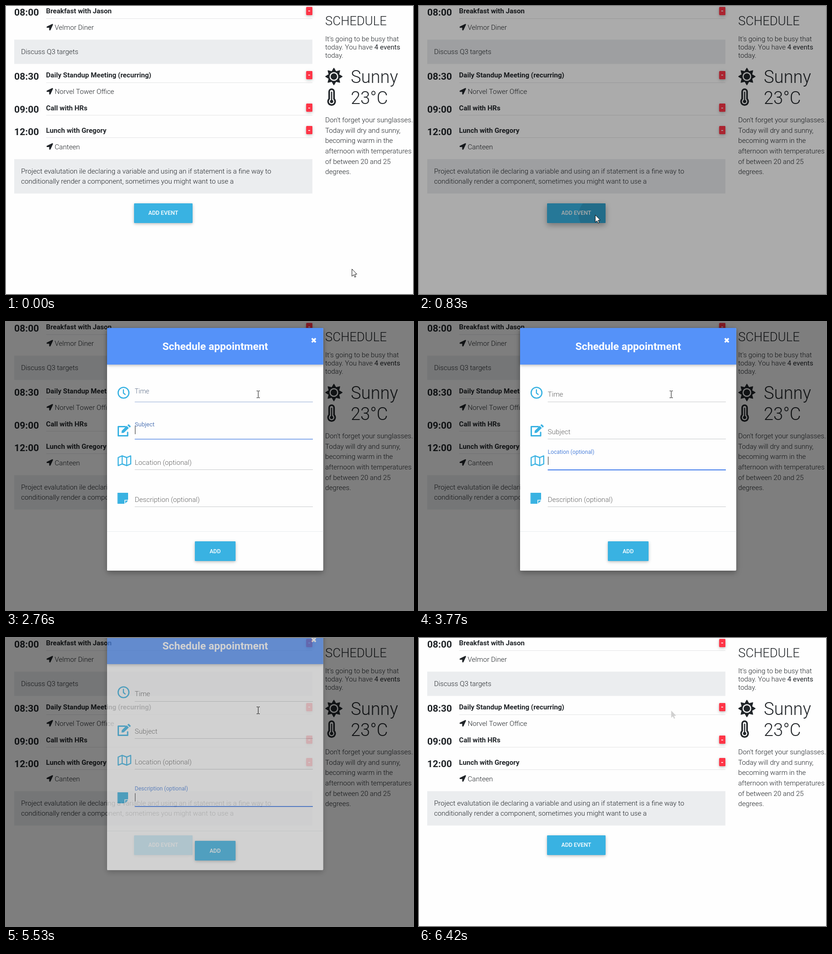
An HTML page with a canvas that plays this animation: 890x629 px, repeating every 6650 ms.

```html
<!DOCTYPE html>
<html lang="en">
<head>
<meta charset="utf-8">
<title>Schedule</title>
<style>
html, body { margin: 0; width: 100%; height: 100%; overflow: hidden; background: #fefefe; }
canvas { display: block; }
</style>
</head>
<body>
<canvas id="stage" width="890" height="629"></canvas>
<script>
const W = 890, H = 629, LOOP = 6650;
const INK = '#212529', SKY = '#39b2e2', BLUE = '#5592f9', PAPER = '#fefefe';
const BASE = 15.15;

const stage = document.getElementById('stage').getContext('2d');
const layer = document.createElement('canvas');
layer.width = W;
layer.height = H;
const dialog = layer.getContext('2d');

// Times in ms
const HOVER = 620, CLICK = 690, DIM = 720, OPEN = 870, CLOSE = 5476, UNDIM = 5762, GHOST = 6420;
const BLINK = 530;

// Shadow layers: drop, blur, opacity
const LOW = [[2, 5, 0.16], [2, 10, 0.12]];
const HIGH = [[5, 11, 0.18], [4, 15, 0.15]];

const events = [
  { y: 11, time: '08:00', title: 'Breakfast with Jason', place: 'Velmor Diner' },
  { y: 151, time: '08:30', title: 'Daily Standup Meeting (recurring)', place: 'Norvel Tower Office' },
  { y: 222.5, time: '09:00', title: 'Call with HRs' },
  { y: 271.5, time: '12:00', title: 'Lunch with Gregory', place: 'Canteen' }
];
const fields = [
  { label: 'Time', base: 163, line: 174, on: 2290, off: 2646 },
  { label: 'Subject', base: 245, line: 255, on: 2646, off: 3505 },
  { label: 'Location (optional)', base: 312, line: 322, on: 3505, off: 4325 },
  { label: 'Description (optional)', base: 393, line: 403, on: 4325, off: Infinity }
];

const clamp = v => Math.min(1, Math.max(0, v));
const mix = (a, b, p) => a + (b - a) * p;
const smooth = v => { v = clamp(v); return v * v * (3 - 2 * v); };
const blend = (a, b, p) => `rgb(${a.map((v, i) => Math.round(mix(v, b[i], p)))})`;

// CSS ease-out: cubic-bezier(0, 0, .58, 1)
function easeOut(x) {
  x = clamp(x);
  let lo = 0, hi = 1;
  for (let i = 0; i < 22; i++) {
    const m = (lo + hi) / 2;
    if (1.74 * m * m - 0.74 * m * m * m < x) lo = m; else hi = m;
  }
  return lo * lo * (3 - 2 * lo);
}

function text(c, str, x, y, size = BASE, weight = 300, color = INK, align = 'left') {
  c.font = `${weight} ${size}px Roboto, sans-serif`;
  c.fillStyle = color;
  c.textAlign = align;
  c.fillText(str, x, y);
  return c.measureText(str).width;
}

function rect(c, x, y, w, h, color) {
  c.fillStyle = color;
  c.fillRect(x, y, w, h);
}

function raised(c, x, y, w, h, r, color, shadows = LOW) {
  c.save();
  c.fillStyle = color;
  c.beginPath();
  c.roundRect(x, y, w, h, r);
  for (const [drop, blur, alpha] of shadows) {
    c.shadowColor = `rgba(0,0,0,${alpha})`;
    c.shadowBlur = blur;
    c.shadowOffsetY = drop;
    c.fill();
  }
  c.restore();
}

function poly(c, points, closed = true) {
  c.beginPath();
  points.forEach(([x, y], i) => i ? c.lineTo(x, y) : c.moveTo(x, y));
  if (closed) c.closePath();
}

function stroke(c, color, width) {
  c.strokeStyle = color;
  c.lineWidth = width;
  c.stroke();
}

// Filled shape with softly rounded corners
function blob(c, points, color, round) {
  poly(c, points);
  c.lineJoin = 'round';
  c.fillStyle = color;
  c.fill();
  stroke(c, color, round);
}

function disc(c, x, y, r, color) {
  c.fillStyle = color;
  c.beginPath();
  c.arc(x, y, r, 0, Math.PI * 2);
  c.fill();
}

function placeIcon(c, x, y) {
  blob(c, [[13.6, 1.4], [2, 6.8], [2, 7.4], [7.7, 7.4], [7.7, 13], [8.3, 13]]
    .map(([dx, dy]) => [x + dx, y + dy]), INK, 2.4);
}

function sunIcon(c, x, y) {
  blob(c, Array.from({ length: 16 }, (_, i) => {
    const r = i % 2 ? 11.5 : 18, a = i * Math.PI / 8;
    return [x + r * Math.cos(a), y + r * Math.sin(a)];
  }), INK, 1.8);
  disc(c, x, y, 9.5, PAPER);
  disc(c, x, y, 7.1, INK);
}

function thermometerIcon(c, x, y) {
  c.lineCap = 'round';
  for (const [width, r, top, color] of [[14.2, 9.5, 7.1, INK], [7.1, 5.9, 7.1, PAPER], [2.4, 3.6, 8.3, INK]]) {
    poly(c, [[x, y + top], [x, y + 28]], false);
    stroke(c, color, width);
    disc(c, x, y + 28.5, r, color);
  }
  c.lineCap = 'butt';
}

function eventRow(c, { y, time, title, place }) {
  text(c, time, 18, Math.round(y + 10), 21, 700);
  text(c, title, 87.5, Math.round(y + 5), BASE, 700);
  rect(c, 88, Math.floor(y + 16), 582, 1, '#e3e4e5');
  raised(c, 656.5, Math.floor(y - 9), 13.5, 18, 2, '#ff3547');
  rect(c, 661, Math.round(y - 1), 4, 1.6, '#fff');
  if (place) {
    placeIcon(c, 88, y + 28);
    text(c, place, 106.5, Math.round(y + 41));
  }
}

function addEventButton(c, t) {
  const hover = t > HOVER && t < 1200;
  raised(c, 280, 431, 128, 43, 2, SKY, hover ? HIGH : LOW);
  const age = t - CLICK;
  if (age > 0 && age < 450) {
    c.save();
    c.beginPath();
    c.rect(280, 431, 128, 43);
    c.clip();
    disc(c, 386, 456, 10 + age * 0.21, `rgba(0,0,0,${0.14 * (1 - age / 450)})`);
    c.restore();
  }
  text(c, 'ADD EVENT', 343.8, 456, 12.3, 500, '#fff', 'center');
}

function sidebar(c) {
  text(c, 'SCHEDULE', 698, 42, 27.3);
  text(c, "It's going to be busy that", 698, 77);
  const lead = text(c, 'today. You have ', 698, 95);
  text(c, '4 events', 698 + lead, 95, BASE, 400);
  text(c, 'today.', 698, 113);
  sunIcon(c, 717, 154);
  thermometerIcon(c, 712, 180);
  text(c, 'Sunny', 754, 168, 38);
  text(c, '23°C', 754, 214, 38);
  ["Don't forget your sunglasses.", 'Today will dry and sunny,', 'becoming warm in the',
    'afternoon with temperatures', 'of between 20 and 25', 'degrees.'
  ].forEach((line, i) => text(c, line, 698, Math.round(254 + i * 22.65)));
}

function page(c, t) {
  rect(c, 0, 0, W, H, PAPER);
  rect(c, 18, 73.5, 652, 53, '#ebedef');
  rect(c, 18, 334.5, 652, 75, '#ebedef');
  events.forEach(e => eventRow(c, e));
  text(c, 'Discuss Q3 targets', 33, 105);
  text(c, 'Project evalutation ile declaring a variable and using an if statement is a fine way to', 33, 366);
  text(c, 'conditionally render a component, sometimes you might want to use a', 33, 388);
  addEventButton(c, t);
  sidebar(c);
}

function fieldIcons(c) {
  c.lineJoin = 'round';
  c.lineCap = 'round';
  // Clock
  c.beginPath();
  c.arc(257, 154.5, 11.8, 0, Math.PI * 2);
  stroke(c, SKY, 2.6);
  poly(c, [[256.8, 148], [256.8, 155.2], [260.6, 158.2]], false);
  stroke(c, SKY, 2.4);
  // Pencil over a sheet
  poly(c, [[261, 228.5], [245.5, 228.5], [245.5, 248.6], [266, 248.6], [266, 241]], false);
  stroke(c, SKY, 3);
  poly(c, [[252.5, 242.5], [253.2, 237.5], [264, 226.8], [268.6, 231.4], [257.6, 242]]);
  c.fillStyle = SKY;
  c.fill();
  blob(c, [[266.2, 225.4], [268.2, 224], [272.2, 228], [270.6, 229.8]], SKY, 1.2);
  // Folded map
  poly(c, [[245.3, 296], [254, 292.4], [264, 296], [272.7, 292.4], [272.7, 310], [264, 313.6], [254, 310], [245.3, 313.6]]);
  stroke(c, SKY, 2.4);
  for (const [x, y] of [[254, 292.4], [264, 296]]) {
    poly(c, [[x, y], [x, y + 17.6]], false);
    stroke(c, SKY, 2.2);
  }
  // Note with a turned corner
  blob(c, [[244.5, 373.5], [266.5, 373.5], [266.5, 388], [258.5, 388], [258.5, 396.5], [244.5, 396.5]], SKY, 1);
  poly(c, [[260.6, 390], [267, 390], [260.6, 396.6]]);
  c.fill();
  c.lineCap = 'butt';
}

function field(c, { label, base, line, on, off }, t) {
  const p = easeOut((t - on) / 200) - easeOut((t - off) / 200);
  rect(c, 281.5, line, 389.5, 1, blend([200, 202, 204], [66, 125, 235], p));
  if (p > 0) rect(c, 281.5, line + 1, 389.5, 1, `rgba(66,125,235,${p * p})`);
  text(c, label, 281.5, base - 24.3 * p, mix(BASE, BASE * 0.8, p), p > 0.5 ? 400 : 300,
    blend([100, 100, 100], [80, 132, 220], p));
  const caret = t >= on && t < off && Math.floor((t - on) / BLINK) % 2 === 0;
  if (caret) rect(c, 282, base - 18, 1, 18, '#222');
}

function modal(c, t) {
  c.clearRect(0, 0, W, H);
  raised(c, 221, 13, 472.5, 530, 2, PAPER, HIGH);
  raised(c, 221, 13, 472.5, 80, [2, 2, 0, 0], BLUE);
  text(c, 'Schedule appointment', 457.5, 61, 22.85, 700, '#fff', 'center');
  for (const d of [-1, 1]) {
    poly(c, [[673 - 4.2, 40 - 4.2 * d], [673 + 4.2, 40 + 4.2 * d]], false);
    stroke(c, '#fff', 3.6);
  }
  fieldIcons(c);
  fields.forEach(f => field(c, f, t));
  rect(c, 221, 457, 472.5, 1, '#e9ecef');
  raised(c, 413, 479, 89, 43, 2, SKY);
  text(c, 'ADD', 457.3, 505, 12.3, 500, '#fff', 'center');
}

function pointerAt(t) {
  if (t < 900) {
    const p = smooth((t - 40) / 620);
    return [mix(756, 385, p), mix(574, 456, p)];
  }
  const u = smooth((t - 960) / 1190), k = 2 * u * (1 - u);
  return [385 + k * 55 + u * u * 166, 456 - k * 26 - u * u * 298];
}

function arrow(c, x, y, ghost) {
  poly(c, [[0, 0], [0, 15.8], [3.7, 12.4], [6.1, 17.8], [8.5, 16.8], [6.1, 11.5], [10.8, 11.2]]
    .map(([dx, dy]) => [x + 0.5 + dx, y + 0.5 + dy]));
  c.lineJoin = 'miter';
  c.fillStyle = ghost ? '#d0d0d0' : '#fff';
  c.fill();
  if (!ghost) stroke(c, '#111', 1);
}

function beam(c, x, y) {
  rect(c, x, y - 7, 1, 14, '#111');
  for (const end of [y - 8, y + 7]) {
    rect(c, x - 3, end, 3, 1, '#111');
    rect(c, x + 1, end, 3, 1, '#111');
  }
}

function pointer(c, t, ghost) {
  const [x, y] = pointerAt(t).map(Math.round);
  const overField = t > OPEN + 200 && t < 5700 && x > 281 &&
    fields.some(f => y > f.line - 31 && y < f.line + 1);
  if (overField) beam(c, x, y); else arrow(c, x, y, ghost);
}

function draw(now) {
  const clock = now % LOOP;
  // The screen is sampled at a steady step
  const t = Math.floor((clock + 36) / 77.2) * 77.2 - 30;
  page(stage, t);

  const dim = 0.5 * (clamp((t - DIM) / 150) - clamp((t - UNDIM) / 150));
  if (dim > 0) rect(stage, 0, 0, W, H, `rgba(0,0,0,${dim})`);

  const alpha = clamp((t - OPEN) / 150) - clamp((t - CLOSE) / 150);
  if (alpha > 0) {
    const shown = easeOut((t - OPEN) / 300) - easeOut((t - CLOSE) / 300);
    modal(dialog, t);
    stage.globalAlpha = alpha;
    stage.drawImage(layer, 0, Math.round(-132 * (1 - shown)));
    stage.globalAlpha = 1;
  }
  pointer(stage, t, clock >= GHOST);
}

const begin = performance.now();
function tick() {
  draw(performance.now() - begin);
  requestAnimationFrame(tick);
}
tick();
</script>
</body>
</html>
```
